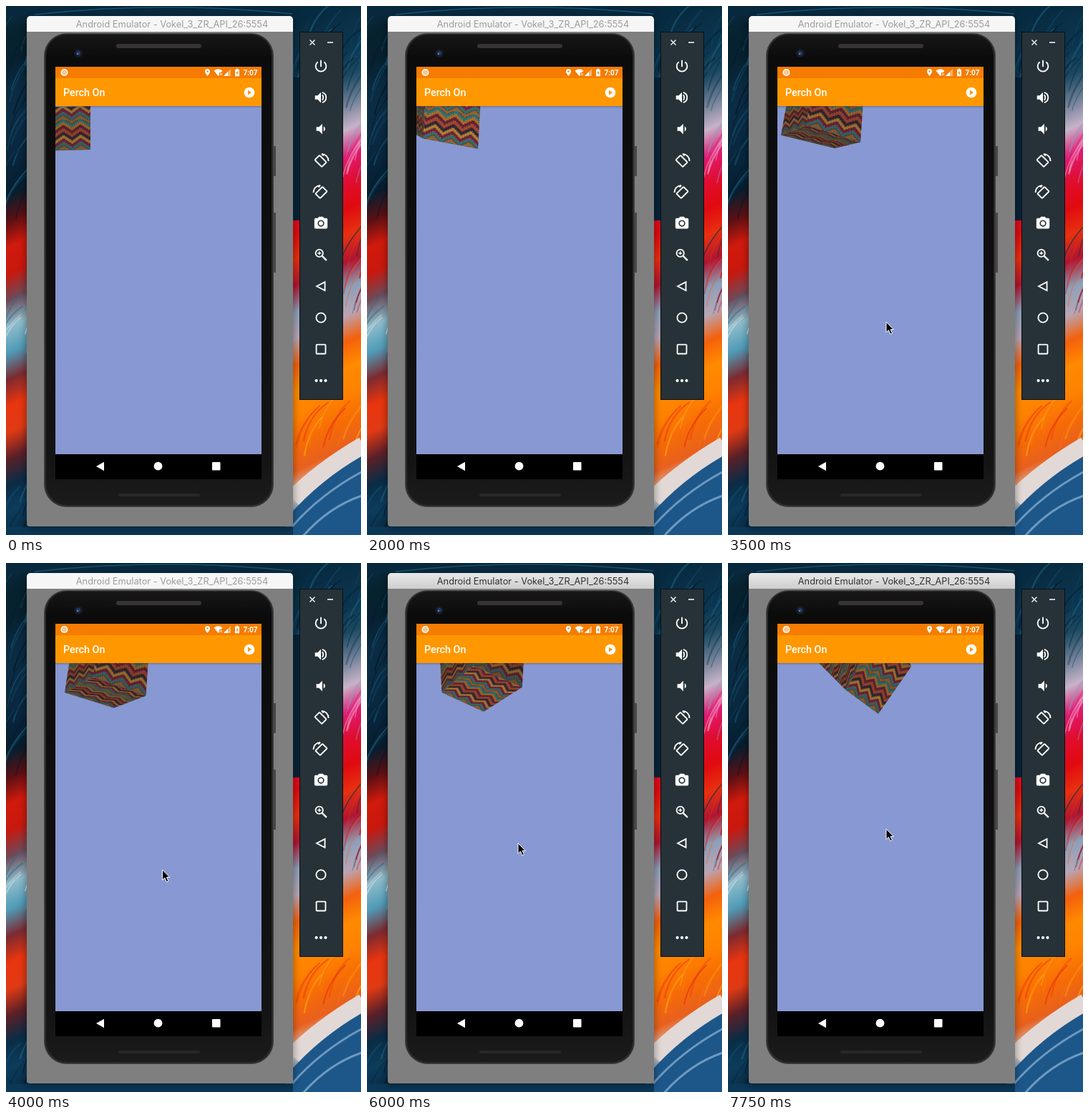
Write an HTML page that moves like this. It is 496 px wide and 740 px high and loops after 8 s.

```html
<!DOCTYPE html>
<html lang="en">
<head>
<meta charset="utf-8">
<title>Spinning cube in an emulator</title>
<style>
html, body { margin: 0; width: 100%; height: 100%; overflow: hidden; background: #0a2a42; }
svg { display: block; width: 496px; height: 740px; }
.ui { font-family: Roboto, "Noto Sans", sans-serif; fill: #fff; }
.line { fill: none; stroke: #fff; stroke-width: 2; }
</style>
</head>
<body>
<svg viewBox="0 0 496 740" xmlns="http://www.w3.org/2000/svg">
  <defs>
    <linearGradient id="bar" x2="0" y2="1"><stop stop-color="#e8e8e8"/><stop offset="1" stop-color="#cecece"/></linearGradient>
    <linearGradient id="shade" x2="0" y2="1"><stop stop-color="#303a70" stop-opacity=".35"/><stop offset="1" stop-color="#303a70" stop-opacity="0"/></linearGradient>
    <linearGradient id="shell" x2="0" y2="1"><stop stop-color="#171717"/><stop offset=".05" stop-color="#0b0b0b"/><stop offset=".9" stop-color="#141414"/><stop offset="1" stop-color="#1b1b1b"/></linearGradient>
    <clipPath id="body"><rect x="69" y="140" width="288" height="487"/></clipPath>
    <filter id="soft" x="-10%" y="-10%" width="120%" height="120%"><feGaussianBlur stdDeviation="5"/></filter>
  </defs>

  <g id="wallpaper" fill="none"></g>
  <rect x="27" y="18" width="376" height="714" rx="6" opacity=".3" filter="url(#soft)"/>
  <path d="M29 36H401V724a4 4 0 0 1-4 4H33a4 4 0 0 1-4-4Z" fill="#7f7f7f"/>
  <path id="titleBar" d="M29 36V19a5 5 0 0 1 5-5H396a5 5 0 0 1 5 5V36Z"/>
  <text id="title" x="232" y="30" text-anchor="middle" font-size="12.800" font-family="Inter, 'Open Sans', sans-serif">Android Emulator - Vokel_3_ZR_API_26:5554</text>

  <path d="M375.500 196v42M375.500 289v84" stroke="#4b4646" stroke-width="3"/>
  <rect x="53.500" y="38.500" width="320" height="662" rx="31" fill="#2b2b2b" stroke="#444"/>
  <rect x="56" y="40" width="315" height="658" rx="29" fill="url(#shell)"/>
  <rect x="154" y="53" width="119" height="6" rx="3" fill="#383333"/>
  <rect x="157" y="682" width="114" height="4" rx="2" fill="#2b2727"/>
  <circle cx="101" cy="66" r="6" fill="#161b25"/>
  <circle cx="101" cy="66" r="3" fill="#243b68"/>
  <circle cx="100" cy="67" r="1" fill="#6f91cf"/>

  <rect x="69" y="85" width="288" height="577"/>
  <rect x="69" y="140" width="288" height="487" fill="#8898d2"/>
  <g id="cube" clip-path="url(#body)"></g>
  <rect x="69" y="140" width="288" height="3" fill="url(#shade)"/>
  <rect x="69" y="85" width="288" height="16" fill="#f57c00"/>
  <rect x="69" y="101" width="288" height="39" fill="#ff9800"/>

  <g class="ui">
    <circle cx="81.500" cy="93" r="4.300" fill="#fbc58f" stroke="#fff" stroke-width="1.500"/>
    <path fill-rule="evenodd" d="M281.500 98c-2-2.600-3.500-4.400-3.500-6.500a3.500 3.500 0 0 1 7 0c0 2.100-1.500 3.900-3.500 6.500Zm0-7.700a1.200 1.200 0 1 0 .01 0Z"/>
    <path d="M290.500 90.500q6-4.500 12 0l-2 2.500h-2.500v3.500l-1.500 1.500Z"/>
    <path d="M299 94l3 3m0-3l-3 3" stroke="#fff"/>
    <path d="M304 98h10V88Z" opacity=".45"/><path d="M304 98h6V92Z"/>
    <path fill-rule="evenodd" d="M320 89h1.500v-1.200h3V89h1.500v9.200h-6Zm3.400 1.500l-2 3.500h1.300v2.700l2-3.500h-1.300Z"/>
    <text x="331.500" y="96.700" font-size="10" font-weight="700">7:07</text>
    <text x="80" y="126" font-size="14.300" font-weight="500">Perch On</text>
    <circle cx="340" cy="121" r="7.300"/>
    <path d="M338 117.500v7l5-3.500Z" fill="#ff9800"/>
    <path d="M126 644l11-6.300v12.600Z"/>
    <circle cx="212.500" cy="643.700" r="5.900"/>
    <rect x="288" y="638" width="11.500" height="11.500" rx="1"/>
  </g>

  <rect x="410.500" y="36.500" width="60" height="514" fill="#263238" stroke="#0a0f12"/>
  <path class="line" style="stroke-width:1.400" d="M424.500 47.500l7 7m0-7l-7 7M449 51h8"/>
  <g id="tools" fill="#fff"></g>
  <path id="cursor" d="M0 0V14.500L3.400 11.400 5.900 17 8.500 15.900 6 10.500H10.300Z" stroke="#fff"/>
</svg>

<script>
const $ = id => document.getElementById(id);
const add = (a, b, k = 1) => [a[0] + b[0] * k, a[1] + b[1] * k];
const sub = (a, b) => add(a, b, -1);
const cross = (a, b) => a[0] * b[1] - a[1] * b[0];
const lerp = (a, b, k) => add(a, sub(b, a), k);
const curve = (a, b, c, k) => lerp(lerp(a, b, k), lerp(b, c, k), k);
const ease = (step, from, to) => {
  const k = Math.min(1, Math.max(0, (step - from) / (to - from)));
  return k * k * (3 - 2 * k);
};

let seed = 11;
const rand = () => (seed = seed * 16807 % 2147483647) / 2147483647;

// Wallpaper: slanted sweeps of evenly spaced colours, with brush strands on top.
function sweep(id, x, width, slant, colors) {
  const stops = colors.split(" ").map((c, i, all) => `<stop offset="${i / (all.length - 1)}" stop-color="#${c}"/>`).join("");
  return `<linearGradient id="${id}" gradientUnits="userSpaceOnUse" x1="0" x2="0" y1="0" y2="740">${stops}</linearGradient>
    <rect x="${-width / 2}" y="-60" width="${width}" height="860" fill="url(#${id})" transform="translate(${x}) skewY(${-slant})"/>`;
}

function strands(count, x, y, w, h, colors) {
  const list = colors.split(" ");
  let out = "";
  for (let i = 0; i < count; i++) {
    const bend = 24 + rand() * 14;
    out += `<path d="M${x + rand() * w} ${y + rand() * h}q${bend * .2} ${-25 - rand() * 15} ${bend} -55"
      stroke="#${list[i % list.length]}" stroke-width="${.6 + rand() * 2}" opacity="${.3 + rand() * .4}"/>`;
  }
  return out;
}

const blues = "0e4a6b 021521 1d6283 062438";
$("wallpaper").innerHTML =
  sweep("west", 14, 60, 25, "0a2b40 07222f 06202f 0a2a40 0b2d45 0a2940 08243a 061e2e 5a1014 d01a0c c8180e 6d4a58 8fbccb 4f9ab6 7c2a30 e8350f e03a14 5b2028 0a2c45 0d3c5c 082a42") +
  sweep("east", 450, 120, 25, "062a40 0a3148 0b3550 1d4a63 6d7f95 c7b3c9 df1b74 e00d30 e00a10 e8300f b01530 8c9fb8 b9a5b5 f4600c ff8a00 ff8200 f66b06 e8601e d8d3d0 2e6291 174a78") +
  strands(26, -15, 60, 45, 240, blues) +
  strands(8, -15, 440, 42, 60, "e6eff0 256e91 6eb2c9") +
  strands(10, -10, 680, 38, 90, blues) +
  strands(30, 395, 50, 100, 100, blues) +
  strands(10, 465, 200, 32, 50, "f2a5c7 8c9abb e4126f") +
  strands(12, 462, 330, 34, 110, "0c2c4a ff5a14 c80714") +
  strands(14, 400, 590, 95, 40, "ffa312 e92c0e ff7610") +
  `<path d="M401 690Q440 650 500 615" stroke="#e2d9d6" stroke-width="26"/>
   <path d="M396 745V712Q440 662 500 628V745Z" fill="#1d578a"/>
   <path d="M400 728Q440 682 500 650M412 745Q450 700 500 684" stroke="#6d9ac0" stroke-width="3"/>
   <path d="M0 735H401" stroke="#0c3858" stroke-width="13"/>
   <path d="M0 7H410" stroke="#08283d" stroke-width="14"/>
   <path d="M40 12Q220 -8 400 11" stroke="#17516f" stroke-width="1.500"/>
   <path d="M405 100V300" stroke="#082338" stroke-width="11"/>`;

// Side panel icons live in 24-unit boxes, 44 px apart.
const rotator = flip => `<g transform="${flip ? "matrix(-1 0 0 1 24 0)" : ""}"><rect class="line" x="4" y="8" width="15" height="10" rx="1" transform="rotate(45 11.500 13)"/><path class="line" d="M13 2A11 11 0 0 1 23.500 13M13 2l3 3"/></g>`;
const tools = [
  `<path class="line" d="M12 3v10M7.300 5.800a8 8 0 1 0 9.400 0"/>`,
  `<path d="M3 9v6h4l5 5V4L7 9Z"/><path class="line" d="M14 8q3 4 0 8M14 4.300a8 8 0 0 1 0 15.400"/>`,
  `<path d="M5 9v6h4l5 5V4L9 9Z"/><path d="M16 8v8q5-4 0-8Z"/>`,
  rotator(false),
  rotator(true),
  `<path fill-rule="evenodd" d="M9 2L7.200 4H4a2 2 0 0 0-2 2v12a2 2 0 0 0 2 2h16a2 2 0 0 0 2-2V6a2 2 0 0 0-2-2h-3.200L15 2Zm3 5a5 5 0 1 1-.01 0Z"/><circle cx="12" cy="12" r="3.200"/>`,
  `<circle class="line" cx="9.500" cy="9.500" r="5.600"/><path class="line" d="M14 14l6.500 6.500" style="stroke-width:2.600"/><path class="line" style="stroke-width:1.500" d="M9.500 6.700v5.600M6.700 9.500h5.600"/>`,
  `<path class="line" d="M5.500 12L18 5.500v13Z"/>`,
  `<circle class="line" cx="12" cy="12" r="7.200"/>`,
  `<rect class="line" x="5" y="5" width="14" height="14" rx="1"/>`,
  [5, 12, 19].map(x => `<circle cx="${x}" cy="12" r="2.300"/>`).join("")
];
$("tools").innerHTML = tools.map((icon, i) =>
  `<g transform="translate(429 ${73 + 44 * i}) scale(.92)">${icon}</g>`).join("");

// Woven fabric: rows of zigzag yarn, each with a dotted thread.
const yarn = ["#2a7f86", "#c27a2c", "#74203c", "#b84f35", "#302b38", "#cf8f3a", "#7d2445", "#367d82", "#ae6a2f"];
const rowGap = 4.5, period = 23, tile = rowGap * yarn.length;
let fabric = "";
for (let row = -3; row < yarn.length + 2; row++) {
  const half = period / 2, zig = `M${-half} ${row * rowGap}` + `l${half} 8l${half} -8`.repeat(2);
  fabric += `<path d="${zig}" stroke="${yarn[(row + yarn.length) % yarn.length]}" stroke-width="3.600"/>
    <path d="${zig}" stroke="${row % 2 ? "#2b1b24" : "#d6a050"}" stroke-dasharray="1.600 1.600" transform="translate(0 2)"/>`;
}
const faceMarkup = id => `<pattern id="${id}Cloth" width="${period}" height="${tile}" patternUnits="userSpaceOnUse">
    <rect width="${period}" height="${tile}" fill="#40232b"/><g fill="none">${fabric}</g></pattern>
  <polygon id="${id}" fill="url(#${id}Cloth)"/><polygon id="${id}Shade" fill="#1d1512"/>`;
$("cube").innerHTML = ["side", "front", "base"].map(faceMarkup).join("");

// The cloth is laid along two edge vectors; one face is 70 cloth units wide.
function setFace(id, visible, corners, origin, across, down, shade) {
  const points = visible ? corners.join(" ") : "";
  $(id).setAttribute("points", points);
  $(id + "Shade").setAttribute("points", points);
  $(id + "Shade").setAttribute("opacity", shade);
  $(id + "Cloth").setAttribute("patternTransform",
    `matrix(${[...across, ...down].map(v => v / 70)} ${origin})`);
}

// The cube tumbles right; its visible corners follow smooth arcs.
function drawCube(u) {
  const hub = curve([45, 203], [93, 180], [200, 112], u);
  const right = curve([118, 201], [178, 210], [256, 145], u);
  const tip = curve([210, 155], [87.5, 213], [210, 211], u);
  const left = curve([80, 168], [22.5, 188], [165, 178], u);
  const topLeft = lerp([32, 140], [127, 140], u);
  const topRight = lerp([118, 140], [254, 140], u);
  const topHub = add(hub, sub(topRight, right));

  const width = sub(right, hub);
  setFace("front", true, [topHub, hub, right, topRight], hub, width, [-width[1], width[0]], .12 + .6 * Math.abs(u - .25));

  const depth = sub(hub, left);
  setFace("side", cross(depth, sub(topHub, left)) < 0, [topLeft, left, hub, topHub], left, depth, [0, 60], .4);

  const baseSeen = cross(sub(right, left), sub(tip, left)) > 0;
  setFace("base", baseSeen, [left, tip, right, hub], left, sub(tip, left), sub(left, hub), .12 + Math.abs(u - .85));
}

function drawPointer(step) {
  const seen = step === 4 || step === 5 || step >= 9;
  let at = [297 + 13 * (step - 4), -4];
  if (step >= 9) {
    at = curve([362, 180], [316, 430], [221, 442], ease(step, 8.5, 12.5));
    at = add(at, [-10, -50], ease(step, 15, 18));
    at = add(at, [10, -20], ease(step, 23, 26));
  }
  $("cursor").style.display = seen ? "" : "none";
  $("cursor").setAttribute("transform", `translate(${at})`);
}

// The picture advances four times a second and rests once on step 19.
const tickMs = 250, lastStep = 27, restStep = 19, restMs = 1000;
function draw(ms) {
  const restAt = restStep * tickMs;
  const moving = ms - Math.min(restMs, Math.max(0, ms - restAt));
  const step = Math.floor(moving / tickMs);
  drawCube(step / lastStep);
  drawPointer(step);

  const active = step >= 17;
  $("titleBar").setAttribute("fill", active ? "url(#bar)" : "#f6f6f6");
  $("title").setAttribute("fill", active ? "#303030" : "#9c9c9c");
}

const start = performance.now();
function tick() {
  draw((performance.now() - start) % 8000);
  requestAnimationFrame(tick);
}
tick();
</script>
</body>
</html>
```
